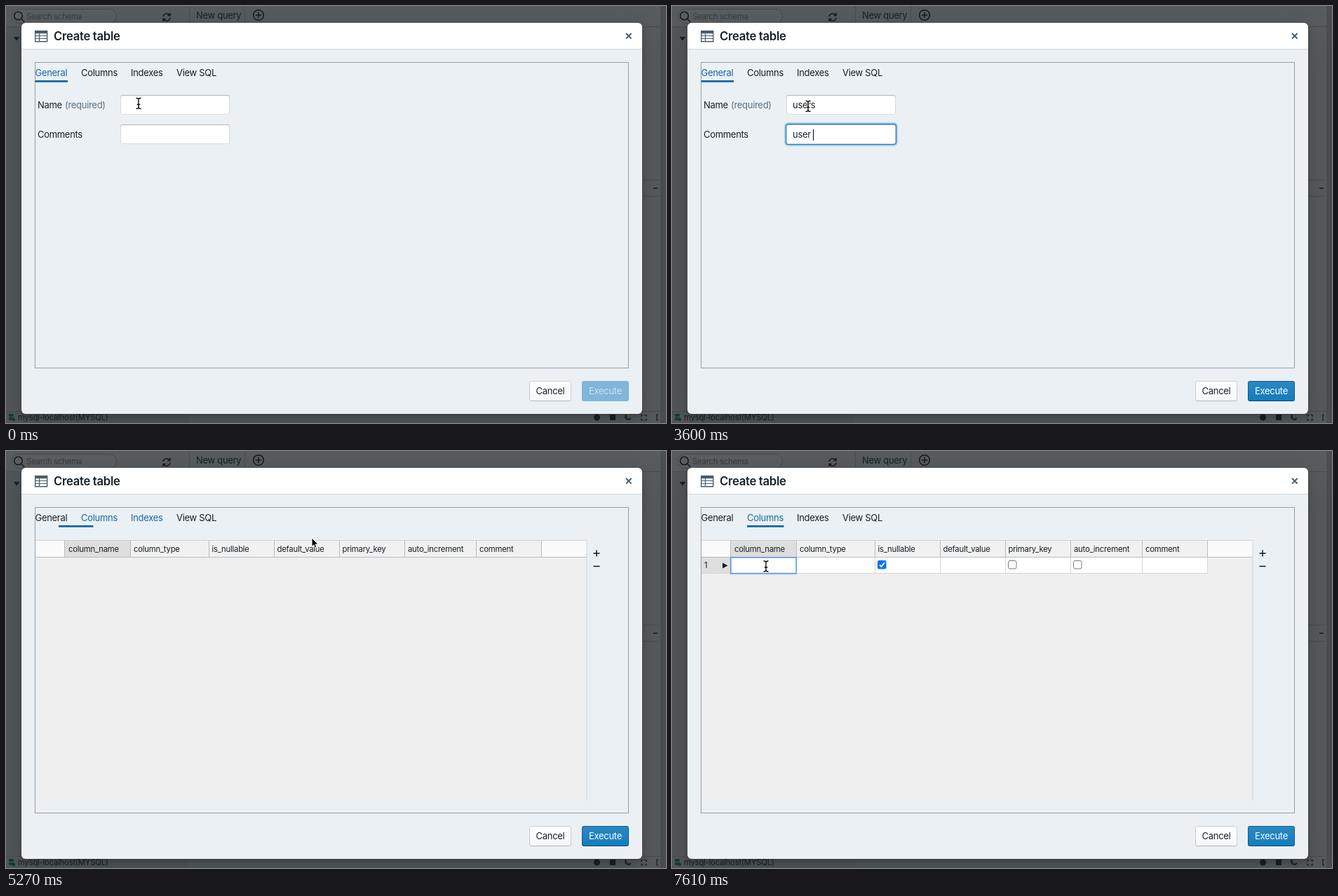
Write an HTML page that moves like this. It is 941 px wide and 595 px high and loops after 8000 ms.

```html
<!DOCTYPE html>
<html lang="en">
<head>
<meta charset="utf-8">
<title>Create table</title>
<style>
html, body { margin: 0; width: 100%; height: 100%; overflow: hidden; background: #585c5f; }
body, text { font: 13px Inter, "Liberation Sans", Arial, sans-serif; letter-spacing: -.3px; }
#stage { position: relative; width: 941px; height: 595px; overflow: hidden; color: #182026; }
#stage > * { position: absolute; box-sizing: border-box; }
svg { left: 0; top: 0; width: 941px; height: 595px; fill: #182026; }
.line { fill: none; stroke: #15191c; stroke-width: 1.5; }
.small, .small text { font-size: 11.3px; letter-spacing: -.22px; }
.dialog {
  left: 22px; top: 24px; width: 885px; height: 558px; border-radius: 6px;
  background: linear-gradient(#fff 37px, #d3d9dd 37px 38px, #ebf0f4 38px);
  box-shadow: 0 0 0 1px rgba(16,22,26,.1), 0 4px 7px rgba(16,22,26,.2), 0 17px 43px 6px rgba(16,22,26,.2);
}
.frame { left: 41px; top: 80px; width: 847px; height: 437px; border: 1px solid #9a9ea2; }
.btn {
  top: 535px; height: 29px; border-radius: 3px; text-align: center; line-height: 29px;
  background: linear-gradient(rgba(255,255,255,.8), rgba(255,255,255,0)) #f5f8fa;
  box-shadow: inset 0 0 0 1px rgba(16,22,26,.2), inset 0 -1px 0 rgba(16,22,26,.1);
}
#run {
  color: #fff;
  background: linear-gradient(rgba(255,255,255,.1), rgba(255,255,255,0)) #137cbd;
  box-shadow: inset 0 0 0 1px rgba(16,22,26,.4), inset 0 -1px 0 rgba(16,22,26,.2);
}
#run.off { background: #7fb6d9; color: rgba(255,255,255,.6); box-shadow: none; }
.field {
  left: 163px; width: 155.5px; height: 28px; padding-left: 9px; border-radius: 3px;
  background: #fff; line-height: 28px; white-space: pre;
  box-shadow: inset 0 0 0 1px rgba(16,22,26,.15), inset 0 1px 1px rgba(16,22,26,.2);
}
.field::after {
  content: ""; position: absolute; inset: 0; border-radius: 3px; opacity: var(--ring, 0);
  box-shadow: 0 0 0 1px #137cbd, 0 0 0 3px rgba(19,124,189,.3);
}
.caret { display: inline-block; width: 1px; height: 16px; margin-right: -1px; background: #000; vertical-align: -3.5px; }
.blue { fill: #106ba3; }
</style>
</head>
<body>
<div id="stage">
  <svg>
    <rect y="29" width="261" height="566" fill="#54585b"/>
    <rect x="933" width="8" height="595" fill="#4b4f52"/>
    <path class="line" style="stroke:#494d50;stroke-width:1" d="M261.5 0v29M340.5 0v29M0 29.5H933M907 248.5h24M907 271.5h24M0 578.5H941"/>
    <rect x="8.5" y="4.5" width="149" height="20" rx="10" fill="#5b5f62" stroke="#45494c"/>
    <g class="line">
      <circle cx="17.5" cy="14" r="5.8"/><path d="M21.7 18.3l4.5 4.4"/>
      <path d="M224 15a5 5 0 0 1 9-2.2M234 10v3.6h-3.6M234 17a5 5 0 0 1-9 2.2M224 22v-3.6h3.6"/>
      <circle cx="360" cy="13" r="7.3"/><path d="M355.8 13h8.4M360 8.8v8.4M923 260h6"/>
      <path d="M884 583a4.4 4.4 0 1 0 7 5.2a4.6 4.6 0 0 1-7-5.2zM906 586v-2.5h2.5M910.500 583.500h2.500v2.500M913 588.500v2.500h-2.500M908.500 591h-2.500v-2.500M930 583h-2v8h2" stroke-width="1.2"/>
    </g>
    <path d="M10.500 44h9l-4.500 5.500z"/>
    <circle cx="842.500" cy="587" r="4.500"/>
    <rect x="861" y="583" width="8" height="8"/>
    <g fill="#153f35"><rect x="4" y="582" width="7" height="4" rx="1"/><rect x="4" y="587" width="7" height="4" rx="1"/><circle cx="11" cy="590" r="2.300"/></g>
    <text x="271" y="18">New query</text>
    <g class="small">
      <text x="29" y="18.700" fill="#383c3f">Search schema</text>
      <text x="17" y="591">mysql-localhost(MYSQL)</text>
    </g>
  </svg>

  <div class="dialog"></div>
  <div class="frame"></div>
  <div class="btn" style="left:746px;width:60px">Cancel</div>
  <div class="btn" id="run" style="left:821px;width:67px">Execute</div>
  <div class="field" id="name" style="top:127px"><span></span><i class="caret"></i></div>
  <div class="field" id="note" style="top:169px"><span></span><i class="caret"></i></div>

  <svg>
    <g fill="none" stroke="#4a5d6d">
      <path d="M41.700 35.700h17v15h-17z" stroke-width="1.400"/>
      <path d="M41 37.500h18" stroke-width="3.500"/>
      <path d="M41 42.500h18M41 46.500h18M47.500 38v13" stroke-width="1.200"/>
      <path d="M884 39l7.600 7.600M891.600 39l-7.600 7.600" stroke-width="2"/>
    </g>
    <text x="68" y="49" style="font-size:16.700px;font-weight:600">Create table</text>
    <text id="tab0" x="41.500" y="99.700">General</text>
    <text id="tab1" x="107" y="99.700">Columns</text>
    <text id="tab2" x="178" y="99.700">Indexes</text>
    <text x="243" y="99.700">View SQL</text>
    <rect id="bar" class="blue" y="106" height="2.800"/>

    <g id="general">
      <text x="45" y="146">Name</text>
      <text x="84" y="146" fill="#5c7080">(required)</text>
      <text x="45" y="188">Comments</text>
    </g>

    <g id="grid" class="small">
      <rect x="42" y="127" width="786" height="372" fill="#efefef"/>
      <rect x="42" y="127" width="786" height="24" fill="#fbfbfb"/>
      <rect x="84" y="127" width="680" height="24" fill="#f1f1f1"/>
      <rect x="84" y="127" width="93" height="24" fill="#dedede"/>
      <path d="M42 127.500h786M828 127.500V499" fill="none" stroke="#cfd1d2"/>
      <path d="M42 151.500h786M83.500 128v23M177.500 128v23M289.500 128v23M382.500 128v23M475.500 128v23M568.500 128v23M670.500 128v23M763.500 128v23" fill="none" stroke="#bcbcbc"/>
      <text x="89" y="143.700">column_name</text>
      <text x="182" y="143.700">column_type</text>
      <text x="293.500" y="143.700">is_nullable</text>
      <text x="386.500" y="143.700">default_value</text>
      <text x="479.500" y="143.700">primary_key</text>
      <text x="573" y="143.700">auto_increment</text>
      <text x="675" y="143.700">comment</text>

      <g id="row">
        <rect x="42" y="152" width="42" height="22.500" fill="#dedede"/>
        <rect x="84" y="152" width="679" height="22.500" fill="#fff"/>
        <path d="M42 174.500h722M177.500 152v22M289.500 152v22M382.500 152v22M475.500 152v22M568.500 152v22M670.500 152v22M763.500 152v22" fill="none" stroke="#d6d6d6"/>
        <path d="M83.500 152v22" stroke="#bcbcbc"/>
        <text x="46" y="167">1</text>
        <path d="M72 159.500v8l7.500-4z"/>
        <rect x="293" y="156" width="12.500" height="12.500" rx="2.300" fill="#0a74f0"/>
        <path d="M296 162.500l2.500 2.600 4.400-5.800" fill="none" stroke="#fff" stroke-width="1.800"/>
        <g fill="#fff" stroke="#767676"><rect x="479.500" y="156.500" width="11.500" height="11.500" rx="2.300"/><rect x="572.500" y="156.500" width="11.500" height="11.500" rx="2.300"/></g>
        <g id="edit">
          <rect x="82.800" y="151" width="95.500" height="25.500" rx="1.500" fill="#3f7fd0" opacity=".28"/>
          <rect x="84" y="152" width="93" height="22.500" fill="#fff" stroke="#4a8be0" stroke-width="1.200"/>
          <rect id="cell" x="88" y="155" width="1" height="16" fill="#000"/>
        </g>
      </g>
      <rect id="hover" x="832" y="137" width="19" height="18" rx="2" fill="#cbd0d4"/>
      <path class="line" d="M837.500 146h9M842 141.500v9M837.500 164.500h9"/>
    </g>

    <g id="mouse">
      <g id="beam" fill="none" stroke-linecap="round">
        <path id="stem" d="M-3-7.500Q0-7.500 0-5.500Q0-7.500 3-7.500M0-5.500V5.500M-3 7.500Q0 7.500 0 5.500Q0 7.500 3 7.500M-1.700 1.500h3.400" stroke="#fff" stroke-width="2.800" opacity=".8"/>
        <use href="#stem" style="opacity:1"/>
        <path d="M-3-7.500Q0-7.500 0-5.500Q0-7.500 3-7.500M0-5.500V5.500M-3 7.500Q0 7.500 0 5.500Q0 7.500 3 7.500M-1.700 1.500h3.400" stroke="#000" stroke-width="1.300"/>
      </g>
      <path id="arrow" d="M0 0V12.500L2.900 9.900 4.800 14.200 7 13.200 5.100 9.100H9z" fill="#000" stroke="#fff"/>
      <g id="hand" stroke="#000" stroke-linejoin="round">
        <path d="M-2.900 1C-2.500-.6-.5-.6 0 1L1.300 5.300C2 4.200 3.700 4.300 4.100 5.700 4.900 4.800 6.300 5 6.600 6.400 7.500 5.900 8.500 6.500 8.500 7.800L8.300 11.500 6.900 14.200V16.200H.4L.2 14.800-5.600 10C-6.800 8.300-4.800 7-3.400 8L-1.400 9.300Z" fill="#fff" stroke-width="1.200"/>
        <path d="M1.800 10v3.500M3.900 10v3.500M6 10v3.500" stroke-width=".9"/>
      </g>
    </g>
  </svg>
</div>
<script>
const LOOP = 8000, BLINK = 535;
const $ = id => document.getElementById(id);
const show = (id, on) => { $(id).style.display = on ? "" : "none"; };
const between = (t, a, b) => t >= a && t < b;
const ramp = (t, a, b) => Math.min(1, Math.max(0, (t - a) / (b - a)));
const last = (list, t) => list.filter(k => k[0] <= t).pop();
const blink = (t, since) => Math.floor((t - since) / BLINK) % 2 === 0;

// [time, characters shown]; the first entry is the moment of focus
const fields = {
  name: { text: "users", keys: [[780, 0], [1590, 1], [1680, 2], [1920, 3], [2010, 4], [2280, 5]], blur: [2640, 2700] },
  note: { text: "user info", keys: [[2640, 0], [2940, 1], [3030, 2], [3360, 3], [3420, 4], [3600, 5], [3680, 6], [3820, 8], [3920, 9]], blur: [5180, 5181] }
};

// [time, x, y, held steps until the next point]
const path = [
  [0, 189, 139, 1], [90, 194, 143, 1], [4480, 194, 143, 4], [4840, 172, 62, 2],
  [5010, 121, 92, 1], [5270, 436, 124, 2], [5450, 720, 160, 4], [5800, 815, 152, 3],
  [6070, 833.5, 142.500, 1], [6270, 833.5, 142.500, 3], [6540, 864, 160, 3],
  [6800, 134, 164.500, 1], [LOOP, 134, 164.500, 1]
];
const shapes = [[0, "beam"], [4570, "arrow"], [5010, "hand"], [5270, "arrow"], [6070, "hand"], [6450, "arrow"], [6980, "beam"]];

function drawField(id, t) {
  const f = fields[id], el = $(id), focus = f.keys[0][0], key = last(f.keys, t);
  el.firstChild.textContent = f.text.slice(0, key ? key[1] : 0);
  const on = key && t < f.blur[0] && blink(t, key[0]);
  el.lastChild.style.visibility = on ? "visible" : "hidden";
  el.style.setProperty("--ring", ramp(t, focus - 30, focus + 90) * (1 - ramp(t, f.blur[0] - 30, f.blur[1])));
  show(id, t < 5270);
}

function drawMouse(t) {
  const i = path.indexOf(last(path, t)), [a, x, y, n] = path[i], [b, x2, y2] = path[i + 1];
  const p = Math.floor(n * (t - a) / (b - a)) / n;
  $("mouse").setAttribute("transform", `translate(${x + (x2 - x) * p} ${y + (y2 - y) * p})`);
  const shape = last(shapes, t)[1];
  for (const s of ["beam", "arrow", "hand"]) show(s, s === shape);
}

function draw(t) {
  const columns = t >= 5270;
  drawField("name", t);
  drawField("note", t);
  $("run").className = t < 1590 ? "btn off" : "btn";
  show("general", !columns);
  show("grid", columns);
  show("row", t >= 6270);
  show("edit", t >= 6980);
  show("cell", t >= 7070 && blink(t, 7070));
  show("hover", between(t, 6070, 6450));
  $("tab0").classList.toggle("blue", !columns);
  $("tab1").classList.toggle("blue", t >= 5010);
  $("tab2").classList.toggle("blue", between(t, 5270, 5360));
  const p = columns ? (t < 5360 ? .51 : 1) : 0;
  $("bar").setAttribute("x", 41.5 + 65.5 * p);
  $("bar").setAttribute("width", 46.5 + 6 * p);
  drawMouse(t);
}

const start = performance.now();
function tick() {
  draw((performance.now() - start) % LOOP);
  requestAnimationFrame(tick);
}
tick();
</script>
</body>
</html>
```
